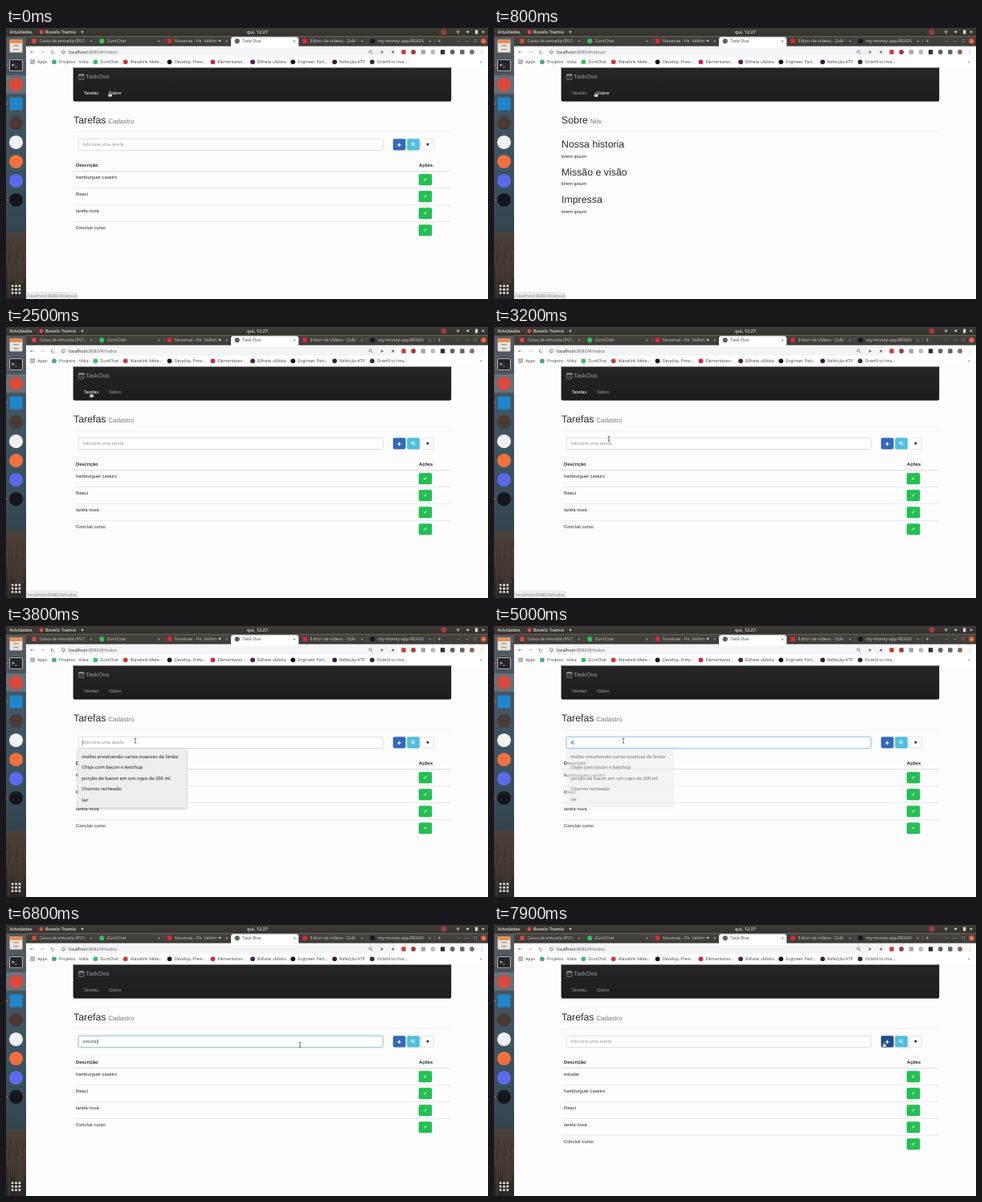
Animation of 600 by 338 pixels, one loop 8000 ms. Source, as an HTML page with a canvas:

```html
<!DOCTYPE html>
<html lang="pt">
<head>
<meta charset="utf-8">
<title>TaskOva</title>
<style>
html, body { margin: 0; width: 100%; height: 100%; overflow: hidden; background: #fdfdfd; }
canvas { display: block; width: 600px; height: 338px; }
</style>
</head>
<body>
<canvas id="stage"></canvas>
<script>
const W = 600, H = 338, LOOP = 8000, STEP = 100;
const UI = '"Open Sans", "Noto Sans", sans-serif';
const PAGE = '"Liberation Sans", Arial, sans-serif';
const SIGN = '"DejaVu Sans", sans-serif';
const canvas = document.getElementById('stage');
const ratio = window.devicePixelRatio || 1;
canvas.width = W * ratio;
canvas.height = H * ratio;
const ctx = canvas.getContext('2d');
ctx.scale(ratio, ratio);
ctx.textRendering = 'geometricPrecision';

// ---- drawing helpers ----
function rect(x, y, w, h, fill) {
  ctx.fillStyle = fill;
  ctx.fillRect(x, y, w, h);
}

function box(x, y, w, h, r, fill, stroke, lw = 0.5) {
  ctx.beginPath();
  ctx.roundRect(x, y, w, h, r);
  if (fill) { ctx.fillStyle = fill; ctx.fill(); }
  if (stroke) { ctx.strokeStyle = stroke; ctx.lineWidth = lw; ctx.stroke(); }
}

function square(x, y, r, fill) {
  box(x - r, y - r, 2 * r, 2 * r, r / 5, fill);
}

function dot(x, y, r, fill) {
  ctx.beginPath();
  ctx.arc(x, y, r, 0, 7);
  ctx.fillStyle = fill;
  ctx.fill();
}

function ring(x, y, r, color, lw) {
  ctx.beginPath();
  ctx.arc(x, y, r, 0, 7);
  ctx.strokeStyle = color;
  ctx.lineWidth = lw;
  ctx.stroke();
}

function line(x0, y0, x1, y1, color, lw = 0.7) {
  ctx.beginPath();
  ctx.moveTo(x0, y0);
  ctx.lineTo(x1, y1);
  ctx.strokeStyle = color;
  ctx.lineWidth = lw;
  ctx.stroke();
}

function text(s, x, y, size, color, font = PAGE, weight = 400) {
  ctx.font = `${weight} ${size}px ${font}`;
  ctx.fillStyle = color;
  ctx.fillText(s, x, y);
  return ctx.measureText(s).width;
}

// one symbol centred on its inked box
function sign(s, x, y, size, color, weight = 400) {
  ctx.font = `${weight} ${size}px ${SIGN}`;
  const m = ctx.measureText(s);
  const dx = (m.actualBoundingBoxRight - m.actualBoundingBoxLeft) / 2;
  const dy = (m.actualBoundingBoxAscent - m.actualBoundingBoxDescent) / 2;
  ctx.fillStyle = color;
  ctx.fillText(s, x - dx, y + dy);
}

function lens(x, y, r, color, lw) {
  ring(x - r * 0.25, y - r * 0.25, r * 0.75, color, lw);
  line(x + r * 0.3, y + r * 0.3, x + r * 1.1, y + r * 1.1, color, lw);
}

function fade(x, y, w, h, ...stops) {
  const g = ctx.createLinearGradient(0, y, 0, y + h);
  stops.forEach((c, i) => g.addColorStop(i / (stops.length - 1), c));
  rect(x, y, w, h, g);
}

function noise(i) {
  const v = Math.sin(i * 12.9898) * 43758.5453;
  return v - Math.floor(v);
}

// ---- desktop ----
const PANEL_INK = '#dfdbd2';

function topBar() {
  fade(0, 0, W, 10.6, '#3f3c37', '#35322d');
  const label = (s, x) => text(s, x, 7, 5.6, PANEL_INK, UI, 600);
  label('Atividades', 4.5);
  label('Bovelo Tramix', 49);
  label('qui, 12:27', 300);
  dot(44, 5, 2.5, '#db4a3c');
  dot(545, 5, 3.6, '#a23a34');
  sign('▾', 95, 5, 6, PANEL_INK);
  sign('▼', 563, 5, 5.5, '#a5a29e');
  sign('◀', 574.5, 5, 4.5, PANEL_INK);
  box(584, 2.6, 3.2, 5, 0.5, PANEL_INK);
  sign('▾', 594, 5, 6, PANEL_INK);
}

const apps = ['#e9e2d9', '#262626', '#db4a3c', '#1f86cc', '#4a3a33', '#f4f1f2', '#f2703d', '#5a6bea', '#16161a'];
const running = [1, 2, 3, 8];

function dock() {
  fade(0, 10, 25, 245, '#565b5f', '#425460', '#3a5361', '#33444d');
  fade(0, 255, 25, 83, '#4d4238', '#3a322c', '#2b2725');
  for (let i = 0; i < 9; i++) {
    const h = 20 + 45 * noise(i);
    rect(i * 2.8, 264 + 30 * noise(i + 9), 2.2, h, 'rgba(120,96,68,.22)');
  }
  apps.forEach((color, i) => {
    const y = 22.5 + 24 * i;
    if (i === 2) rect(0, y - 11.5, 25, 23, 'rgba(255,255,255,.16)');
    if (i < 2 || i === 3) square(12.5, y, 8, color);
    else dot(12.5, y, 8.6, color);
    if (running.includes(i)) dot(1.2, y, 1.1, '#e2582c');
  });
  rect(4.5, 14.5, 16, 4.5, '#e98b4f');
  for (const y of [21, 26]) box(9.5, y, 6, 1.6, 0.5, '#a49a90');
  box(4.5, 39.5, 16, 14, 1.5, null, '#c9c9c9', 0.9);
  text('>_', 6.5, 47.5, 5.5, '#fff', SIGN, 700);
  for (let i = 0; i < 9; i++) square(8.1 + i % 3 * 4.4, 321.7 + (i / 3 | 0) * 4.4, 1.3, '#e6e6e6');
}

// ---- browser ----
const GRAY = '#5f6368', TAB = 84.25, ACTIVE = 3;
const tabs = [
  ['Caixa de entrada (951) - m', '#d9483d'], ['ZuntChat', '#31c45b'], ['Novenas - Pe. Valtim', '#e3262b'],
  ['Task Ova', GRAY], ['Editor de vídeos - Zolk', '#e3262b'], ['my-money-app/READM', '#17181a']
];

function tabStrip() {
  fade(25, 10.6, 575, 12.4, '#45433e', '#3c3b37');
  box(280, 11.2, TAB, 14, [3, 3, 0, 0], '#fff');
  tabs.forEach(([label, color], i) => {
    const x = 35 + TAB * i, ink = i === ACTIVE ? '#3c4043' : '#cfcbc2';
    if (i % 2) dot(x, 16.3, 3.1, color);
    else square(x, 16.3, 2.7, color);
    ctx.save();
    ctx.beginPath();
    ctx.rect(x, 10, 63.5, 13);
    ctx.clip();
    text(label, x + 6.6, 18.2, 5.5, ink, UI);
    ctx.restore();
    sign('✕', x + 71, 16.3, 4.2, ink);
    if (Math.abs(i + 0.5 - ACTIVE) > 1) rect(x + 76.7, 13.5, 0.5, 6, '#77746f');
  });
  const ink = '#d4d0c7';
  sign('◀', 266, 16.3, 4.2, ink);
  sign('+', 539.5, 16.3, 6, ink);
  sign('⌄', 564, 16, 5, ink);
  sign('−', 574, 16.5, 5, ink);
  sign('□', 584, 16.3, 4.5, ink);
  dot(594.5, 16.3, 3.4, '#e0592f');
  sign('✕', 594.5, 16.3, 3.6, '#fff');
}

const extensions = ['#d33a33', '#a43a3c', '#a2a5a8', '#b8babd', '#2b2f33', GRAY, GRAY, '#8a6a53'];

function toolbar(route) {
  rect(25, 22.7, 575, 26, '#fff');
  sign('←', 33, 30, 6.5, GRAY);
  sign('→', 45.5, 30, 6.5, '#a9acb0');
  sign('↻', 58, 30, 6.5, GRAY);
  box(65, 24.8, 422, 10.6, 5.3, '#f3f4f5');
  ring(71.5, 30, 2.1, GRAY, 0.6);
  sign('i', 71.5, 30, 3.2, GRAY, 700);
  const host = text('localhost', 78, 32, 5.6, '#202124', UI);
  text(':8080/#/' + route, 78 + host, 32, 5.6, GRAY, UI);
  lens(454, 30, 2.2, GRAY, 0.7);
  sign('➤', 468, 30, 6, GRAY);
  sign('★', 481.5, 30, 6, GRAY);
  extensions.forEach((color, i) => {
    const x = 495 + 12.15 * i;
    if (i % 2) dot(x, 30, 2.9, color);
    else square(x, 30, 2.7, color);
  });
  sign('⋮', 592.5, 30, 6.5, GRAY);
}

const bookmarks = [
  ['Apps'], ['Projetos - Voka', '#4aa59c'], ['ZuntChat', '#31c45b'], ['Wavelink Mete...', '#d9372c'],
  ['Develop. Previ...', '#151515'], ['Elementares...', '#d5204f'], ['Bilhete uMoka', '#5a1950'],
  ['Engineer Patt...', '#151515'], ['Refeição-KTP', '#46143f'], ['Octet9 to Ima...', '#26313c']
];

function bookmarkBar() {
  const hues = ['#e0493e', '#4a83e8', '#41a45a'];
  for (let i = 0; i < 9; i++) {
    const c = i % 3, r = i / 3 | 0;
    square(31.1 + c * 2, 40.3 + r * 2, 0.7, hues[(c + r) % 3]);
  }
  let x = 39;
  bookmarks.forEach(([label, color]) => {
    if (color) dot(x - 6, 42.3, 2.9, color);
    x += text(label, x, 44.3, 5.3, '#3c4043', UI) + 14.6;
  });
  sign('»', 591, 42.3, 5.5, GRAY);
}

// ---- page ----
const BODY = 5.75, HEAD = 12.35, INK = '#2b2b2b';

function navbar(onTasks, onAbout) {
  const gray = '#9d9d9d';
  ctx.save();
  ctx.beginPath();
  ctx.roundRect(83.7, 48, 470.4, 43.6, 2);
  ctx.clip();
  fade(83.7, 49.5, 470.4, 42.1, '#252427', '#1d1c1f');
  ctx.restore();
  box(83.9, 47, 470, 44.4, 2, null, '#0c0c0c');
  box(90.6, 58.2, 6.4, 6.2, 0.6, null, gray, 0.7);
  rect(90.6, 57.6, 6.4, 1.8, gray);
  sign('✔', 93.8, 61.9, 4, gray);
  text('TaskOva', 99.3, 63.4, 7.4, gray);
  text('Tarefas', 96.5, 83, BODY, onTasks ? '#fff' : gray);
  text('Sobre', 128, 83, BODY, onAbout ? '#fff' : gray);
}

function header(title, sub) {
  const w = text(title, 84, 119, HEAD, INK);
  text(sub, 84 + w + 2.7, 119, 8, '#777');
  rect(84, 129.4, 470, 0.5, '#e6e6e6');
}

function aboutPage() {
  header('Sobre', 'Nós');
  ['Nossa historia', 'Missão e visão', 'Impressa'].forEach((title, i) => {
    const y = 149.3 + i * 34.3;
    text(title, 84, y, HEAD, INK);
    text('lorem ipsum', 83.7, y + 12.8, BODY, INK);
  });
}

function field({ focus, typed, caret }) {
  ctx.save();
  if (focus) {
    ctx.shadowColor = 'rgba(102,175,233,.45)';
    ctx.shadowBlur = 2.5 * ratio;
  }
  box(90.2, 138.2, 379, 14.3, 1.7, '#fff', focus ? '#74b5ea' : '#ccc', 0.6);
  ctx.restore();
  const w = typed ? text(typed, 95.2, 147.3, BODY, '#555') : 0;
  if (!typed) text('Adicione uma tarefa', 95.2, 147.3, BODY, '#999');
  if (caret) rect(95.2 + w, 142.2, 0.5, 6.4, '#333');
}

function tasksPage(state) {
  const { pressed, added } = state;
  header('Tarefas', 'Cadastro');
  field(state);
  const button = (x, fill, edge) => box(x, 138.4, 15.2, 13.8, 1.6, fill, edge);
  button(482, pressed ? '#204d8c' : '#336ab8', pressed ? '#122b4c' : '#2c5fa6');
  button(499.5, '#4fbfe0', '#46b0d2');
  button(517.2, '#fff', '#ccc');
  sign('✚', 489.5, 145.3, 6, '#fff');
  lens(507, 145.2, 2.2, '#fff', 1);
  sign('✖', 524.7, 145.3, 5.2, '#222');

  text('Descrição', 87, 172.6, BODY, INK, PAGE, 700);
  text('Ações', 514, 172.6, BODY, INK, PAGE, 700);
  const rows = ['hamburguer caseiro', 'React', 'tarefa nova', 'Concluir curso'];
  if (added) rows.unshift(WORD);
  rows.forEach((label, i) => {
    const y = 178.2 + i * 21.05;
    rect(84, y, 470, i ? 0.5 : 0.9, '#d9d9d9');
    text(label, 87, y + 9.9, BODY, INK);
    box(514, y + 4.1, 16, 13.6, 1.6, '#22c052', '#1db04a');
    sign('✔', 522, y + 10.9, 6, '#fff');
  });
}

const hints = ['molho envolvendo varias nuances de limão', 'Chips com bacon e ketchup',
  'porção de bacon em um copo de 200 ml', 'Churros recheado', 'tar'];

function suggestions(alpha) {
  const k = 0.96 + 0.04 * alpha;
  ctx.save();
  ctx.globalAlpha = alpha;
  ctx.translate(157, 190);
  ctx.scale(k, k);
  ctx.translate(-157, -190);
  ctx.shadowColor = `rgba(0,0,0,${0.3 * alpha ** 6})`;
  ctx.shadowBlur = 3 * ratio;
  ctx.shadowOffsetY = 0.8 * ratio;
  box(89.6, 153.2, 135, 73.6, 1, '#eeeeee');
  ctx.shadowColor = 'transparent';
  hints.forEach((h, i) => text(h, 94.3, 164.8 + i * 13.5, 5.75, '#3d3d3d', UI, 600));
  ctx.restore();
}

function statusBubble(route) {
  box(25, 329.6, 65, 9, [0, 2, 0, 0], '#ebecee', '#d8d8d8', 0.4);
  text('localhost:8080/#/' + route, 27, 335.7, 5.7, '#808387', UI);
}

// ---- pointer ----
const spots = {
  about: [129, 80], tasks: [106, 82], story: [97, 166], entry: [143, 139.5],
  field: [161, 143], end: [366, 149.5], add: [485.5, 146.5]
};
const moves = [
  [700, 1200, 'tasks'], [1200, 1700, 'story'], [1900, 2300, 'tasks'], [2700, 3200, 'entry'],
  [3200, 3500, 'field'], [6400, 6800, 'end'], [6800, 7300, 'add']
];

function pointerAt(t) {
  let [x, y] = spots.about;
  for (const [from, to, name] of moves) {
    const u = Math.min(1, Math.max(0, (t - from) / (to - from)));
    const e = u * u * (3 - 2 * u);
    x += (spots[name][0] - x) * e;
    y += (spots[name][1] - y) * e;
  }
  return [x, y];
}

function pointer(x, y, kind) {
  const edge = '#333';
  if (kind === 'hand') {
    box(x - 2, y + 2, 5, 3.7, 1.2, '#fff', edge, 0.6);
    box(x - 0.7, y, 1.4, 4, 0.7, '#fff', edge, 0.6);
  } else if (kind === 'beam') {
    line(x, y - 2.8, x, y + 2.8, '#444', 0.8);
    for (const dy of [-2.8, 2.8]) line(x - 1.3, y + dy, x + 1.3, y + dy, '#444');
  } else {
    line(x + 1.5, y + 3, x + 2.8, y + 6.4, edge, 1.4);
    ctx.beginPath();
    ctx.moveTo(x, y);
    ctx.lineTo(x, y + 5.8);
    ctx.lineTo(x + 4, y + 4.2);
    ctx.closePath();
    ctx.fillStyle = '#fff';
    ctx.fill();
    ctx.strokeStyle = edge;
    ctx.lineWidth = 0.6;
    ctx.stroke();
  }
}

// ---- timeline ----
const WORD = 'estudar', KEY_FROM = 5000, KEY_GAP = 210, BLINK = 600;
const OPEN_ABOUT = 400, OPEN_TASKS = 2500, FOCUS = 3700, BLUR = 7500, ADD = 7600;
const within = (v, a, b) => v >= a && v < b;

function draw(t) {
  const about = within(t, OPEN_ABOUT, OPEN_TASKS);
  const [x, y] = pointerAt(t);
  const onLinks = within(y, 73, 90);
  const overTasks = onLinks && within(x, 91, 121);
  const overAbout = onLinks && within(x, 122, 149);
  const onForm = !about && within(y, 137, 154);
  const overAdd = onForm && within(x, 482, 497);
  const overField = onForm && within(x, 90, 470);

  const keys = t < KEY_FROM ? 0 : Math.min(WORD.length, Math.floor((t - KEY_FROM) / KEY_GAP) + 1);
  const lastKey = keys ? KEY_FROM + Math.ceil((keys - 1) * KEY_GAP / STEP) * STEP : FOCUS;
  const state = {
    focus: within(t, FOCUS + 200, BLUR),
    caret: within(t, FOCUS, BLUR) && Math.floor((t - lastKey) / BLINK) % 2 === 0,
    typed: t < ADD ? WORD.slice(0, keys) : '',
    pressed: overAdd,
    added: t >= ADD
  };
  const tasksLit = overTasks || t < OPEN_ABOUT || within(t, OPEN_TASKS, FOCUS);

  rect(0, 0, W, H, '#fdfdfd');
  navbar(tasksLit, overAbout || about);
  if (about) aboutPage();
  else tasksPage(state);
  if (within(t, FOCUS, KEY_FROM + 150)) suggestions(Math.min(1, 1 - (t - KEY_FROM + 100) / 250));
  if (t < 3400) statusBubble(t < 1000 ? 'about' : 'todos');
  tabStrip();
  toolbar(about ? 'about' : 'todos');
  bookmarkBar();
  dock();
  topBar();
  pointer(x, y, overTasks || overAbout || overAdd ? 'hand' : overField ? 'beam' : 'arrow');
}

const start = performance.now();
function tick() {
  const t = (performance.now() - start) % LOOP;
  draw(Math.floor(t / STEP) * STEP);
  requestAnimationFrame(tick);
}
tick();
</script>
</body>
</html>
```
